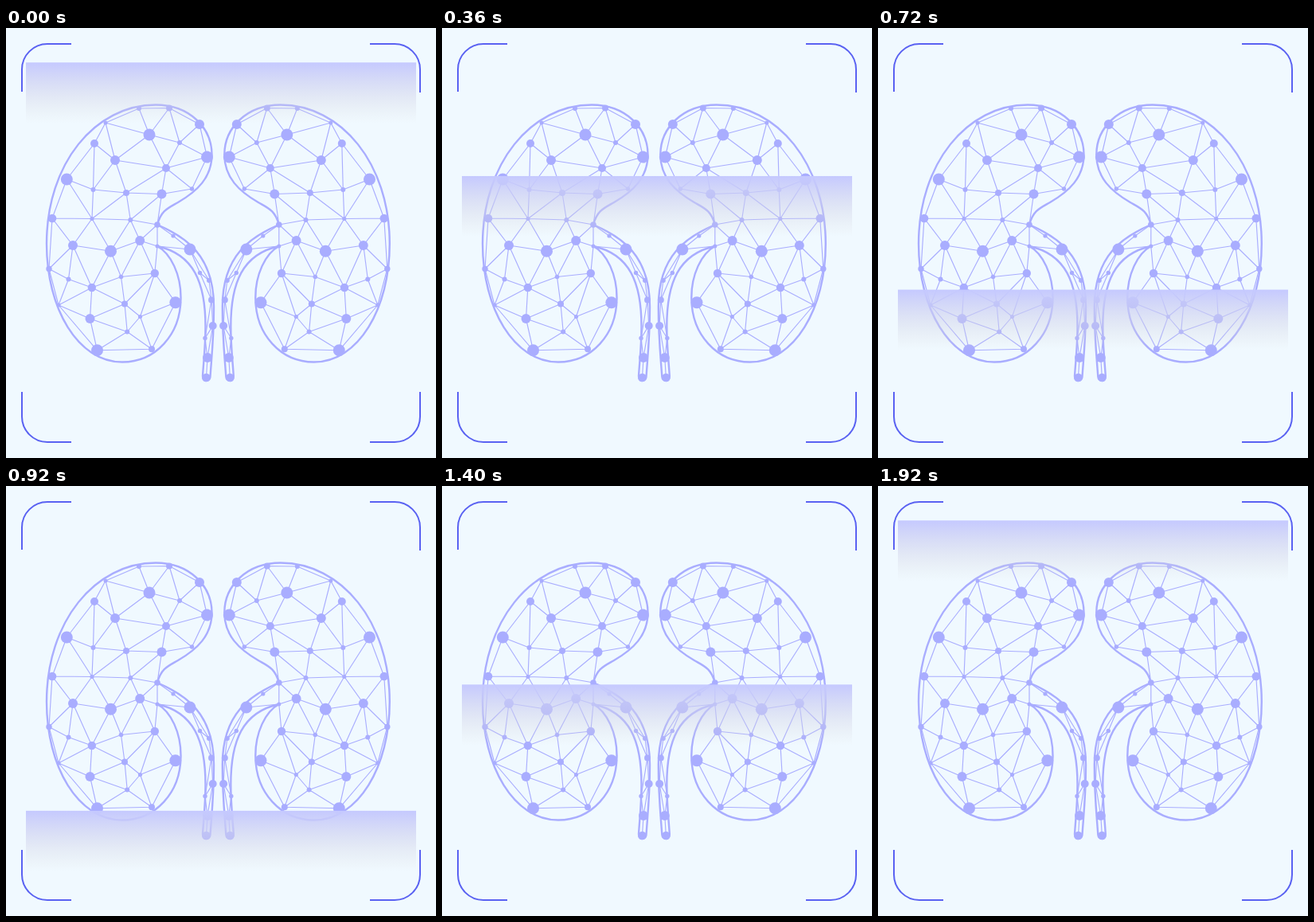
An HTML page for the animation above (1.96 s loop, 540 by 540 pixels).

```html
<!DOCTYPE html>
<html lang="en">
<head>
<meta charset="utf-8">
<title>Kidney scan</title>
<style>
  html, body { margin: 0; width: 100%; height: 100%; overflow: hidden; background: #f0f9ff; }
  svg { display: block; width: 100vw; height: 100vh; }
</style>
</head>
<body>
<svg viewBox="0 0 540 540" fill="none">
  <defs>
    <linearGradient id="fade" x1="0" y1="0" x2="0" y2="1">
      <stop offset="0" stop-color="#c5c9ff"/>
      <stop offset="1" stop-color="#d9d9d9" stop-opacity="0"/>
    </linearGradient>
    <g id="kidney" stroke="#a9adff">
      <path stroke-width="2.4" d="M190 274C207 283 220 310 219.5 340C219 385 188 419.5 146 419.5
        C90 419.5 51 352 51 271C51 170 112 96.5 188 96.5C230 96.5 258.5 125 258.5 159
        C258.5 188 240 205 216 219C203 226.5 195 229 190 247C225 262 261 285 261 350
        C261 390 258 415 256.5 438Q256 443 251 443Q247 443 247 437
        C248 420 250.5 400 250.5 375C250.5 320 236 284 190 274Z"/>
      <path id="mesh" stroke-width="1.15"/>
      <g id="dots" fill="#a9adff" stroke="none"/>
    </g>
  </defs>
  <use href="#kidney"/>
  <use href="#kidney" transform="matrix(-1 0 0 1 532.8 0)"/>
  <path stroke="#5a62f2" stroke-width="2" d="M20 80V52A32 32 0 0 1 52 20H82M457 20H488A32 32 0 0 1 520 52V81
    M520 457V488A32 32 0 0 1 488 520H457M82 520H52A32 32 0 0 1 20 488V457"/>
  <rect id="scan" x="25" y="43.3" width="490" height="76" fill="url(#fade)"/>
</svg>
<script>
const $ = id => document.getElementById(id);

// Node: x, y, radius; named A..Z then a..s
const nodes = [
  [167, 101, 3], [205, 100.5, 4], [243, 121, 6], [125, 119, 2.5], [180, 134, 7.5],
  [111, 145, 5], [218, 144, 3], [252.5, 162, 7.5], [137, 166, 6], [201, 176, 5],
  [76.3, 190, 7.5], [109.5, 203, 3], [151, 207, 4], [195.5, 208.5, 6], [233.5, 202, 2.7],
  [58, 239, 5.3], [108, 239.5, 2.6], [156.3, 241, 3], [190, 247, 3.8], [84, 273, 6],
  [131.5, 280.3, 7.5], [168.2, 267, 6], [190, 274, 2.5], [231, 278, 7.5], [54, 302.5, 3.7],
  [78.5, 315.5, 3], [107.8, 326, 5.2], [144.5, 312.5, 2.8], [186.8, 308, 5.2], [212.8, 344.7, 7.5],
  [66, 348, 2.5], [105.5, 365, 6], [149, 346.5, 4], [168.5, 362.5, 2.6], [152.2, 381.5, 3],
  [183, 403.3, 4], [114.5, 404.8, 7.5], [210, 261, 2.6], [243.5, 307.5, 2.7], [255, 317, 3],
  [258, 341.5, 4], [259.7, 374, 5], [250, 389.5, 2.7], [253, 414, 6], [251.5, 439, 5.3]
];
const names = "ABCDEFGHIJKLMNOPQRSTUVWXYZabcdefghijklmnopqrs";

// Each word: a node followed by the nodes it links to
const links = "ABDE BCEG CGH DEFI EGIJ FIKL GHJ HJO IJLM JMNO KLPQ LMQ MNQR NORS " +
  "PQTY QRTU RSUV SVWl TUYZa UVab Vbcw VW WXc lX Vb YZe Zae abefg bcg cdgh " +
  "dhj efk fgik ghi hij ijk jk Xmn mno no opq pqr qr rs";

const at = c => nodes[names.indexOf(c)];
$("mesh").setAttribute("d", links.split(" ").map(([from, ...rest]) =>
  rest.filter(at).map(to => `M${at(from).slice(0, 2)}L${at(to).slice(0, 2)}`).join("")).join(""));
$("dots").innerHTML = nodes.map(([x, y, r]) => `<circle cx="${x}" cy="${y}" r="${r}"/>`).join("");

// The band moves in 40 ms steps: 24 down, 24 up, then one step of rest
const STEP = 40, STEPS = 49, TOP = 43.3, RISE = 15.85;
const start = performance.now();
function draw(now) {
  const i = Math.floor(Math.max(0, now - start) / STEP) % STEPS;
  $("scan").setAttribute("y", TOP + RISE * Math.min(i, STEPS - 1 - i));
  requestAnimationFrame(draw);
}
draw(start);
</script>
</body>
</html>
```
